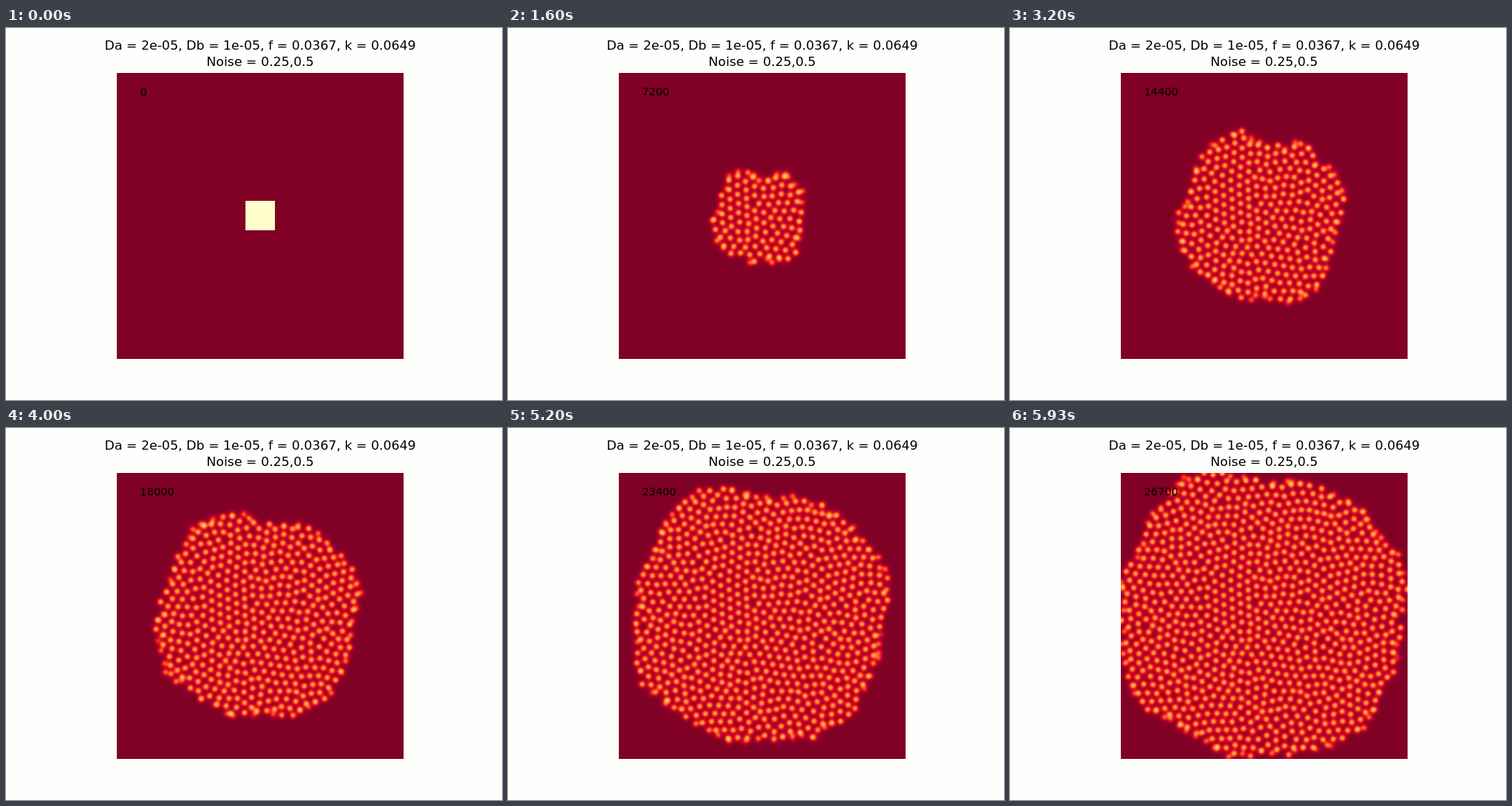
Animation, 640 px wide and 480 px high, one loop 6 s. Source, as an HTML page with a canvas:

```html
<!DOCTYPE html>
<html>
<head>
<meta charset="utf-8">
<style>
  html, body { margin: 0; width: 100%; height: 100%; overflow: hidden; background: #fefefc; }
  canvas { display: block; }
</style>
</head>
<body>
<canvas width="640" height="480"></canvas>
<script>
const ctx = document.querySelector('canvas').getContext('2d');
const W = 370, H = 369, LEFT = 143, TOP = 58, CX = 185, CY = 184;
const LOOP = 6000, FRAMES = 90, STEPS_PER_FRAME = 300;
const SPACING = 12, REPEL = 13.5, PEAK = 0.6, SIGMA = 2.9, KERNEL = 10;

// Colour ramp from the resting medium to the densest spots.
const RAMP = [
  [128, 0, 38], [189, 0, 38], [227, 26, 28], [252, 78, 42], [253, 141, 60],
  [254, 178, 76], [254, 217, 118], [255, 237, 160], [255, 255, 204]
];

// Colony radius every 15 degrees, clockwise from the right, at each key time.
const KEY_TIMES = [0, 1600, 3200, 5200];
const RADII = [
  Array.from({ length: 24 }, (_, i) => {
    const a = i * Math.PI / 12;
    return 15 / Math.max(Math.abs(Math.cos(a)), Math.abs(Math.sin(a)));
  }),
  [51, 54, 59, 63, 67, 66, 58, 60, 61, 68, 69, 69, 64, 57, 63, 66, 71, 58, 49, 56, 62, 61, 64, 57],
  [100, 95, 98, 109, 117, 114, 105, 109, 110, 112, 116, 114, 113, 99, 107, 113, 118, 115, 92, 95, 110, 99, 108, 110],
  [155, 158, 157, 169, 170, 165, 158, 168, 160, 166, 178, 170, 165, 165, 165, 174, 183, 171, 151, 159, 163, 163, 165, 170]
];

const clamp = x => Math.min(1, Math.max(0, x));
const mix = (a, b, u) => a + (b - a) * u;

let seed = 7;
function random() {
  seed = (seed * 1664525 + 1013904223) % 4294967296;
  return seed / 4294967296;
}

// Scattered points, evened out by mutual repulsion.
function makeSpots() {
  const spots = [];
  const jitter = () => (random() - 0.5) * 20;
  const rowHeight = SPACING * 0.866;
  for (let row = -2; row * rowHeight < H + 24; row++) {
    for (let col = -2; col * SPACING < W + 24; col++) {
      spots.push({
        x: (col + (row & 1) / 2) * SPACING + jitter(),
        y: row * rowHeight + jitter(),
        lead: (random() - 0.5) * 8
      });
    }
  }
  for (let pass = 0; pass < 40; pass++) {
    for (let i = 0; i < spots.length; i++) {
      for (let j = 0; j < i; j++) {
        const a = spots[i], b = spots[j];
        const dx = a.x - b.x, dy = a.y - b.y;
        if (Math.abs(dx) > REPEL || Math.abs(dy) > REPEL) continue;
        const d = Math.hypot(dx, dy) || 0.01;
        if (d > REPEL) continue;
        const push = (REPEL - d) * 0.15 / d;
        a.x += dx * push; a.y += dy * push;
        b.x -= dx * push; b.y -= dy * push;
      }
    }
  }
  for (const s of spots) {
    s.r = Math.hypot(s.x - CX, s.y - CY);
    s.sector = (Math.atan2(s.y - CY, s.x - CX) / Math.PI * 12 + 24) % 24;
  }
  spots.sort((a, b) => a.r - b.r);
  // Each spot splits off its nearest neighbour further in.
  for (const s of spots) {
    let best = Infinity;
    s.parent = s;
    for (const p of spots) {
      if (p.r > s.r - 4) break;
      const d = Math.hypot(p.x - s.x, p.y - s.y);
      if (d < best) { best = d; s.parent = p; }
    }
  }
  return spots;
}

function reach(sector, t) {
  const k = t < 1600 ? 0 : t < 3200 ? 1 : 2;
  const u = (t - KEY_TIMES[k]) / (KEY_TIMES[k + 1] - KEY_TIMES[k]);
  const i = Math.floor(sector), f = sector - i;
  const at = radii => mix(radii[i % 24], radii[(i + 1) % 24], f);
  return mix(at(RADII[k]), at(RADII[k + 1]), u);
}

const spots = makeSpots();
const field = new Float32Array(W * H);
const image = ctx.createImageData(W, H);

function addSpot(x, y, strength) {
  const x0 = Math.max(0, Math.ceil(x - KERNEL)), x1 = Math.min(W - 1, x + KERNEL);
  const y0 = Math.max(0, Math.ceil(y - KERNEL)), y1 = Math.min(H - 1, y + KERNEL);
  for (let py = y0; py <= y1; py++) {
    for (let px = x0; px <= x1; px++) {
      const d2 = (px - x) ** 2 + (py - y) ** 2;
      field[py * W + px] += strength * Math.exp(-d2 / (2 * SIGMA * SIGMA));
    }
  }
}

function drawField(t) {
  field.fill(0);
  const settled = clamp(t / 270);
  for (let y = 165; y < 203; y++) {
    for (let x = 166; x < 204; x++) field[y * W + x] = 1 - settled;
  }
  for (const s of spots) {
    const u = clamp((reach(s.sector, t) - s.r + s.lead + 9) / 11);
    s.px = mix(s.parent === s ? s.x : s.parent.px, s.x, u);
    s.py = mix(s.parent === s ? s.y : s.parent.py, s.y, u);
    if (u > 0) addSpot(s.px, s.py, PEAK * settled * u);
  }
  field.forEach((v, i) => {
    const level = clamp(v) * 8, k = Math.min(7, Math.floor(level));
    for (let c = 0; c < 3; c++) {
      image.data[i * 4 + c] = mix(RAMP[k][c], RAMP[k + 1][c], level - k);
    }
    image.data[i * 4 + 3] = 255;
  });
  ctx.putImageData(image, LEFT, TOP);
}

function drawText(text, x, y, size, align) {
  ctx.font = `${size}px "DejaVu Sans", sans-serif`;
  ctx.textAlign = align;
  ctx.fillStyle = '#000';
  ctx.fillText(text, x, y);
}

let shown = -1;
function draw() {
  const frame = Math.floor((performance.now() + 4) % LOOP / LOOP * FRAMES);
  if (frame !== shown) {
    shown = frame;
    ctx.fillStyle = '#fefefc';
    ctx.fillRect(0, 0, 640, 480);
    drawText('Da = 2e-05, Db = 1e-05, f = 0.0367, k = 0.0649', 328, 28, 16.55, 'center');
    drawText('Noise = 0.25,0.5', 328, 49, 16.55, 'center');
    drawField(frame * LOOP / FRAMES);
    drawText(frame * STEPS_PER_FRAME, 173, 87, 13.89, 'left');
  }
  requestAnimationFrame(draw);
}
draw();
</script>
</body>
</html>
```
